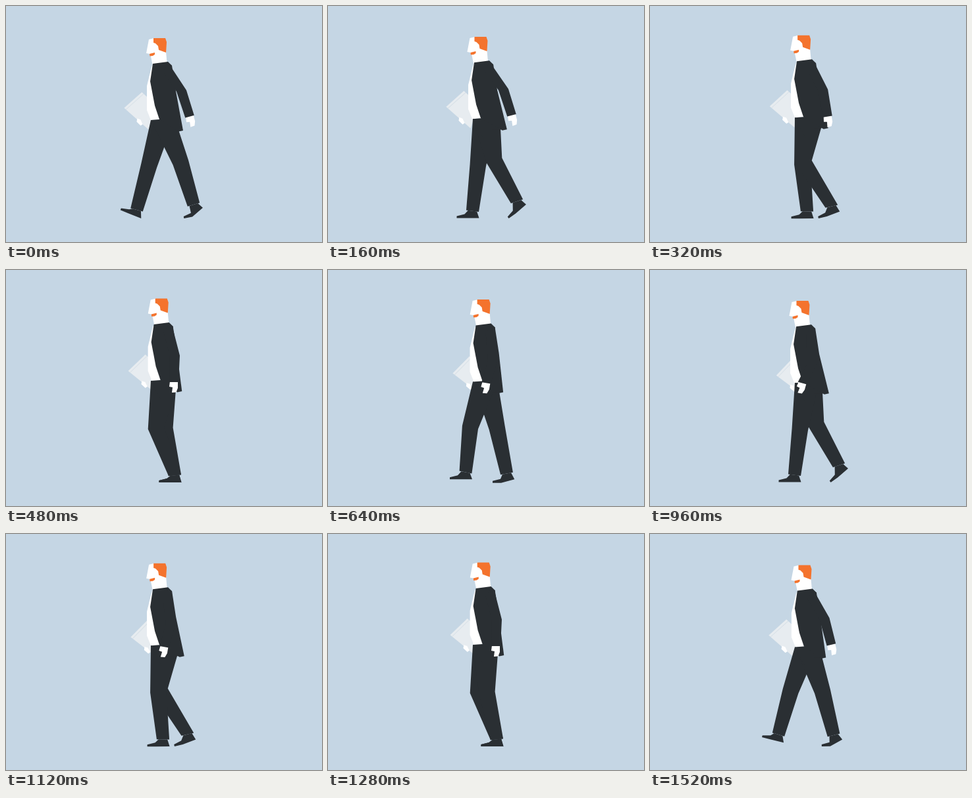
Write an HTML page that moves like this. It is 480 by 360 pixels and loops after 1.6 s.

```html
<!DOCTYPE html>
<html lang="en">
<head>
<meta charset="utf-8">
<title>Walking man</title>
<style>
html, body { margin: 0; width: 100%; height: 100%; overflow: hidden; background: #c5d6e4; }
svg { display: block; width: 100%; height: 100%; }
</style>
</head>
<body>
<svg id="stage" viewBox="0 0 480 360"></svg>
<script>
const LOOP = 1600, STEP = 80, GROUND = 324;
const SUIT = '#2a2f33', HAIR = '#f4732d', PAPER = '#e7ecf0', WHITE = '#fff';
const { sin, cos, PI } = Math;
const stage = document.getElementById('stage');

function shape(fill) {
  const el = document.createElementNS('http://www.w3.org/2000/svg', 'polygon');
  el.setAttribute('fill', fill);
  stage.appendChild(el);
  return el;
}

// Painted from back to front
const folder = shape(PAPER), crease = shape('#d6dfe6'), farHand = shape(WHITE);
const face = shape(WHITE), hair = shape(HAIR), beard = shape(HAIR), shirt = shape(WHITE);
const legs = [0, 1].map(() => ({ shoe: shape(SUIT), trouser: shape(SUIT) }));
const hips = shape(SUIT), jacket = shape(SUIT), hand = shape(WHITE), arm = shape(SUIT);

// Path of one ankle: time, x, y, sole angle
const STRIDE = [
  [0, 198.5, 311, 22],
  [160, 219.5, 312.7, 0],
  [480, 256.5, 313.3, 0],
  [640, 271.5, 310.5, -15],
  [800, 285, 303, -41],
  [960, 287, 298, -41],
  [1280, 256.5, 313.3, 0],
  [1440, 209, 308.5, 0],
  [1520, 195, 306, 14]
];

// Smooth closed curve through the key points
function follow(keys, t) {
  const n = keys.length;
  const at = i => keys[(i + n) % n];
  const time = i => at(i)[0] + Math.floor(i / n) * LOOP;
  let i = n - 1;
  while (keys[i][0] > t) i--;
  const span = time(i + 1) - time(i), u = (t - time(i)) / span;
  const slope = (j, k) => (at(j + 1)[k] - at(j - 1)[k]) / (time(j + 1) - time(j - 1)) * span;
  return [1, 2, 3].map(k => {
    const a = at(i)[k], b = at(i + 1)[k];
    return a + (b - a) * u * u * (3 - 2 * u)
      + slope(i, k) * u * (1 - u) ** 2 - slope(i + 1, k) * u * u * (1 - u);
  });
}

const draw = (el, pts) =>
  el.setAttribute('points', pts.map(p => p[0].toFixed(2) + ',' + p[1].toFixed(2)).join(' '));
const mix = (a, b, u) => a.map((v, i) => v + (b[i] - v) * u);
const shift = (pts, dx, dy) => pts.map(([x, y]) => [x + dx, y + dy]);
const rad = deg => deg * PI / 180;

// Turns local points by an angle in degrees and moves them to an origin
function place(pts, [ox, oy], deg) {
  const c = cos(rad(deg)), s = sin(rad(deg));
  return pts.map(([x, y]) => [ox + x * c - y * s, oy + x * s + y * c]);
}

// The knee bends far in the swing and a little in mid stance
function kneeBend(t) {
  const u = t / (LOOP / 2);
  return u < 1 ? 10 * sin(PI * u) ** 4 : 27 * sin(PI * (u - 1) ** 0.85) ** 2;
}

function drawLeg(leg, t, hipY) {
  const [ax, ay, sole] = follow(STRIDE, t);
  const ankle = [ax, ay];
  const back = (ax - 242) / 45;
  const hip = [241 + 5 * back, hipY + 1];
  const knee = shift([mix(hip, ankle, 0.5)], -kneeBend(t), 0)[0];
  const tilt = -Math.atan2(ax - hip[0], ay - hip[1]) * 180 / PI * -1;
  const across = (p, half) => place([[-half, 0], [half, 0]], p, -tilt);
  const [kneeF, kneeB] = across(knee, 12.3), [hemF, hemB] = across(ankle, 9.6);
  draw(leg.trouser, [[220, hipY], kneeF, hemF, hemB, kneeB, [256 + 6 * back, hipY + 14]]);

  const heel = place([[10, 10.8]], ankle, sole * 0.7)[0];
  const ball = place([[-21, 0]], heel, sole)[0];
  // The toes flatten where they would sink into the ground
  const flat = -Math.asin(Math.min(1, Math.max(0, (GROUND - ball[1]) / 13))) * 180 / PI;
  const toes = place([[-13, 0], [-13, -3], [-1, -6]], ball, Math.max(sole, flat));
  draw(leg.shoe, [mix(hemF, hemB, 0.15), mix(hemF, hemB, 0.85), heel, ball, ...toes]);
}

function drawHead(x, y) {
  draw(face, shift([[217, 51], [225, 49], [236, 58], [243, 70], [245, 92], [223, 92],
    [220, 77], [218, 73], [213, 72]], x, y));
  draw(hair, shift([[224, 49], [242, 49], [244, 55], [243, 71], [232, 67], [231, 61],
    [227, 57], [224, 56]], x, y));
  draw(beard, shift([[218, 73], [226, 71], [226, 74], [223, 76], [218.5, 76.5]], x, y));
}

function drawTorso(x, y, hem) {
  const hipY = 174 + y;
  draw(shirt, shift([[222, 90], [220, 97], [214, 122], [214, 159], [220, 174], [234, 173],
    [228, 100]], x, y));
  draw(hips, [[220, hipY], [233 + x, hipY - 1], [258, hipY], [263, hipY + 16],
    [250, hipY + 16], [236, hipY + 30]]);
  draw(jacket, [...shift([[233, 173], [226, 152], [219, 115], [223, 88], [246, 85], [252, 91],
    [258, 130]], x, y), [hem, 190 + y], [hem - 7, 191.5 + y]]);
}

function drawArm(swing, x, y) {
  const shoulder = shift([[238, 100], [247, 87], [252, 91], [252, 95]], x, y);
  const elbow = [264 - 10.5 * swing, 135.5 + 7.5 * swing + y];
  const cuff = [262 - 25 * swing, 176 + 5 * swing - 5 * swing ** 2 + y];
  const turn = 16 * swing;
  const inner = place([[-14, 0]], cuff, turn)[0];
  draw(arm, [...shoulder, elbow, cuff, inner, [elbow[0] - 15, elbow[1] + 2]]);
  draw(hand, place([[1, -1], [13, -1], [13, 9], [10.5, 15.5], [4, 16], [5, 8], [0, 7]],
    inner, turn));
}

function drawFolder(swing, y) {
  const corner = [185.6 + 6.5 * swing, 159 + 3.7 * swing + y];
  const put = pts => place(pts, corner, -2.5 - 2.5 * swing);
  draw(folder, put([[0, 0], [27, -24], [50, -3], [37, 33]]));
  draw(crease, put([[2.4, 2.2], [29.4, -21.8], [30, -21.2], [3, 2.8]]));
  draw(farHand, put([[20, 16], [19, 21], [25, 27], [28, 25], [25, 18]]));
}

function render(ms) {
  const t = Math.floor(ms / STEP) * STEP % LOOP;
  const step = 4 * PI * t / LOOP;
  const swing = -cos(2 * PI * (t - 80) / LOOP);
  // The body bobs and sways once per step
  const bob = -3.15 + 2.42 * cos(step) + 1.05 * sin(step) + 0.74 * cos(2 * step);
  const sway = 0.8 - 0.77 * cos(step) - 2.2 * sin(step);
  const x = sway * 0.6, y = bob * 0.9;
  drawFolder(swing, y);
  drawHead(sway, bob);
  drawTorso(x, y, 269 + 3 * sin(step));
  legs.forEach((leg, i) => drawLeg(leg, (t + i * LOOP / 2) % LOOP, 174 + y));
  drawArm(swing, x, y);
}

let start;
function tick(now) {
  if (start === undefined) start = now;
  render(Math.max(0, now - start));
  requestAnimationFrame(tick);
}
render(0);
requestAnimationFrame(tick);
</script>
</body>
</html>
```
